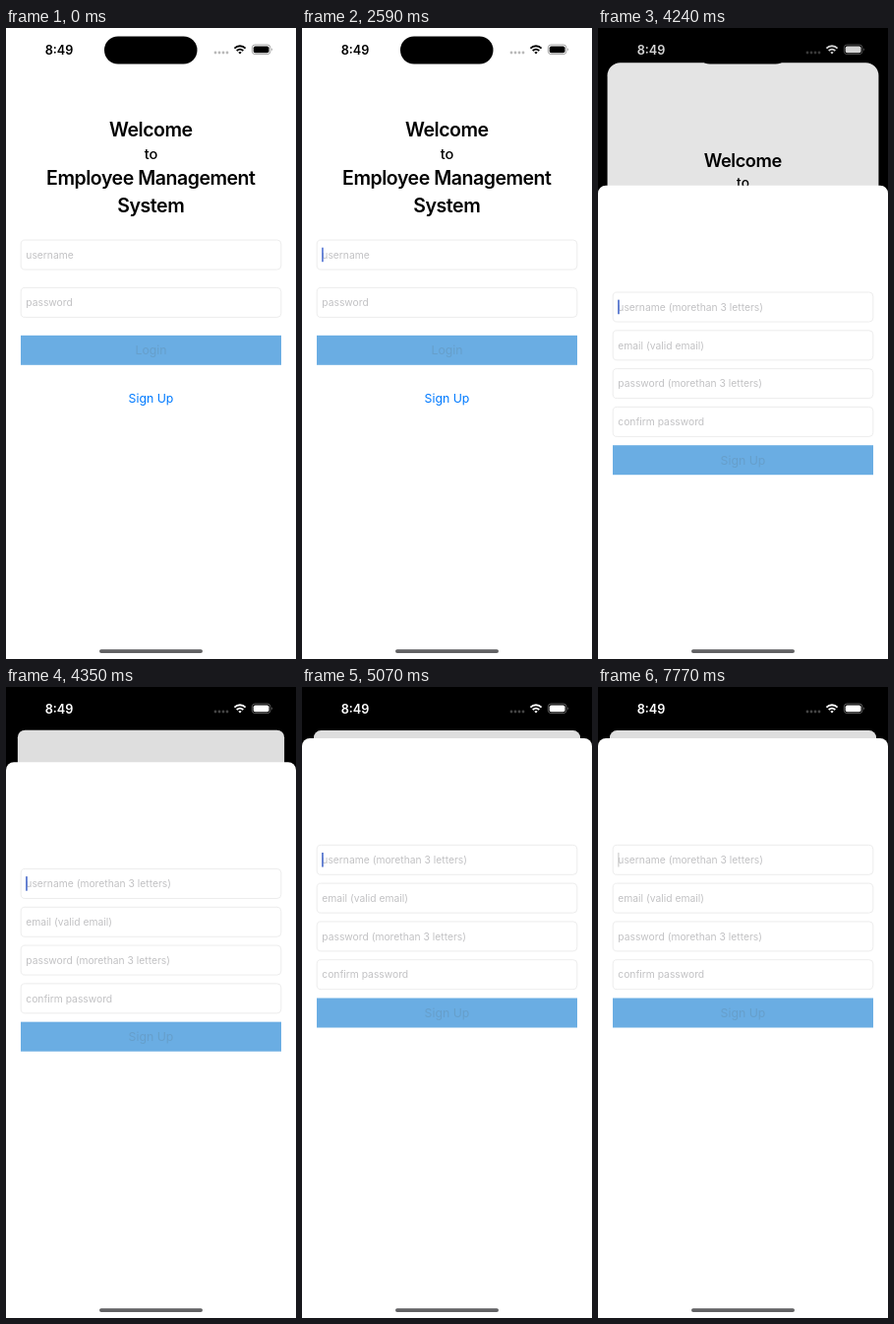
These frames come from a looping animation (295 px wide and 640 px high, 8 s). An HTML page:

```html
<!DOCTYPE html>
<html lang="en">
<head>
<meta charset="utf-8">
<title>Login and sign up</title>
<style>
  html, body { margin: 0; width: 100%; height: 100%; overflow: hidden; background: #fff; }
  svg { display: block; width: 100%; height: 100%; }
  text { font-family: Inter, sans-serif; }
  .mid { text-anchor: middle; }
  .title { font-size: 19.5px; font-weight: 620; letter-spacing: -.46px; }
  .to { font-size: 14.6px; font-weight: 450; }
  .link { font-size: 12.3px; fill: #007aff; }
  .off { font-size: 12.3px; fill: #669fcb; }
  .hint { font-size: 10.3px; fill: #c2c2c4; }
  .time { font-size: 12.7px; font-weight: 600; }
  .field { fill: #fff; stroke: #e8e8e8; stroke-width: .8; }
  .button { fill: #6aade3; }
  .caret { fill: #4468d0; }
</style>
</head>
<body>
<svg viewBox="0 0 295 640" preserveAspectRatio="xMidYMin meet">
  <rect id="back" width="295" height="640"/>
  <g id="card">
    <rect id="page" width="295" height="700" fill="#fff"/>
    <g id="login">
      <text class="title mid" x="147.3" y="109.5">Welcome</text>
      <text class="to mid" x="147.5" y="132.5">to</text>
      <text class="title mid" x="147.3" y="159">Employee Management</text>
      <text class="title mid" x="147.3" y="186.5">System</text>
      <g id="loginForm"></g>
      <text class="link mid" x="147.5" y="379.7">Sign Up</text>
      <rect class="caret" id="loginCaret" x="20.2" width="1.5" height="14.5"/>
    </g>
    <rect id="dim" width="295" height="700"/>
  </g>
  <g id="sheet">
    <rect width="295" height="700" rx="8" fill="#fff"/>
    <g id="signForm"></g>
    <rect x="20.4" y="116" width="1" height="14.5" fill="#c4c4c4"/>
    <rect class="caret" id="signCaret" x="20.2" y="116" width="1.5" height="14.5"/>
  </g>
  <rect x="100" y="8.5" width="94.5" height="28" rx="14"/>
  <g id="status">
    <text class="time mid" x="54" y="26.5">8:49</text>
    <g id="dots" opacity=".27"></g>
    <g fill="none" stroke="currentColor" stroke-width="1.9">
      <path d="M232.4 20.6a8 8 0 0 1 11.2 0M234.7 23a4.8 4.8 0 0 1 6.6 0"/>
      <path d="M238 26.6l-1.7-1.8a2.5 2.5 0 0 1 3.4 0z" fill="currentColor" stroke="none"/>
    </g>
    <rect x="250.3" y="17" width="18.6" height="9.6" rx="3" fill="none" stroke="currentColor" stroke-width=".8" opacity=".45"/>
    <rect x="251.7" y="18.4" width="15.8" height="6.8" rx="1.8"/>
    <path d="M270 20.2q1.6 1.6 0 3.2z" opacity=".5"/>
  </g>
  <rect x="95" y="630.2" width="105" height="3.8" rx="1.9" fill="#626264"/>
</svg>
<script>
  const LOOP = 8000;
  const $ = id => document.getElementById(id);
  const clamp = v => Math.max(0, Math.min(1, v));
  const mix = (a, b, k) => a + (b - a) * k;

  const field = (y, hint) =>
    `<rect class="field" x="15.2" y="${y}" width="264.6" height="30" rx="4"/>
     <text class="hint" x="20.3" y="${y + 18.7}">${hint}</text>`;
  const button = (y, label) =>
    `<rect class="button" x="15" y="${y}" width="265" height="30"/>
     <text class="off mid" x="147.5" y="${y + 19.3}">${label}</text>`;

  $('loginForm').innerHTML =
    field(215, 'username') + field(263.4, 'password') + button(311.8, 'Login');
  $('signForm').innerHTML =
    ['username (morethan 3 letters)', 'email (valid email)',
     'password (morethan 3 letters)', 'confirm password']
      .map((hint, i) => field(108.3 + i * 38.8, hint)).join('') + button(263.5, 'Sign Up');
  $('dots').innerHTML = [213, 217, 221, 225]
    .map(x => `<circle cx="${x}" cy="25" r="1.4"/>`).join('');

  // Caret opacity changes: [time, opacity]
  const loginBlink = [[0, 0], [150, .5], [270, 1], [810, .5], [930, 0], [1170, .5], [1290, 1],
    [1430, 0], [1610, 1], [2120, .5], [2230, 0], [2480, .5], [2590, 1], [3130, .5], [3240, 0],
    [3480, .5], [3600, 1], [3860, 0]];
  const signBlink = [[0, 1], [4570, .5], [4670, 0]];
  for (let t = 4950; t < LOOP; t += 1020)
    signBlink.push([t, .5], [t + 120, 1], [t + 660, .5], [t + 780, 0]);
  const at = (steps, t) => steps.filter(s => s[0] <= t).pop()[1];

  // Critically damped rise of the sheet, sampled every 110 ms
  function rise(t) {
    const held = 4020 + Math.floor((t - 4020) / 110) * 110;
    const x = Math.max(0, held - 4057) * .017;
    return 1 - (1 + x) * Math.exp(-x);
  }

  function draw(t) {
    const p = t < 4020 ? 0 : rise(t);
    const q = clamp((p - .225) / .74);
    const scale = mix(1, .9187, q);
    $('back').setAttribute('fill', p > 0 ? '#000' : '#fff');
    $('card').setAttribute('transform',
      `translate(${147.5 * (1 - scale)} ${44 * q}) scale(${scale})`);
    const radius = p > 0 ? mix(38, 8, q) : 0;
    for (const id of ['page', 'dim']) $(id).setAttribute('rx', radius);
    $('dim').setAttribute('opacity', .13 * q);
    $('login').setAttribute('transform', `translate(0 ${3.5 * clamp(q * 6)})`);
    $('sheet').setAttribute('transform', `translate(0 ${mix(640, 52, p)})`);

    const light = Math.round(255 * clamp((q - .2) / .72));
    const tone = `rgb(${light},${light},${light})`;
    $('status').setAttribute('fill', tone);
    $('status').setAttribute('color', tone);

    $('loginCaret').setAttribute('y', t < 1500 ? 271 : 222.7);
    $('loginCaret').setAttribute('opacity', at(loginBlink, t));
    $('signCaret').setAttribute('opacity', at(signBlink, t));
  }

  const start = performance.now();
  function tick() {
    draw((performance.now() - start) % LOOP);
    requestAnimationFrame(tick);
  }
  tick();
</script>
</body>
</html>
```
